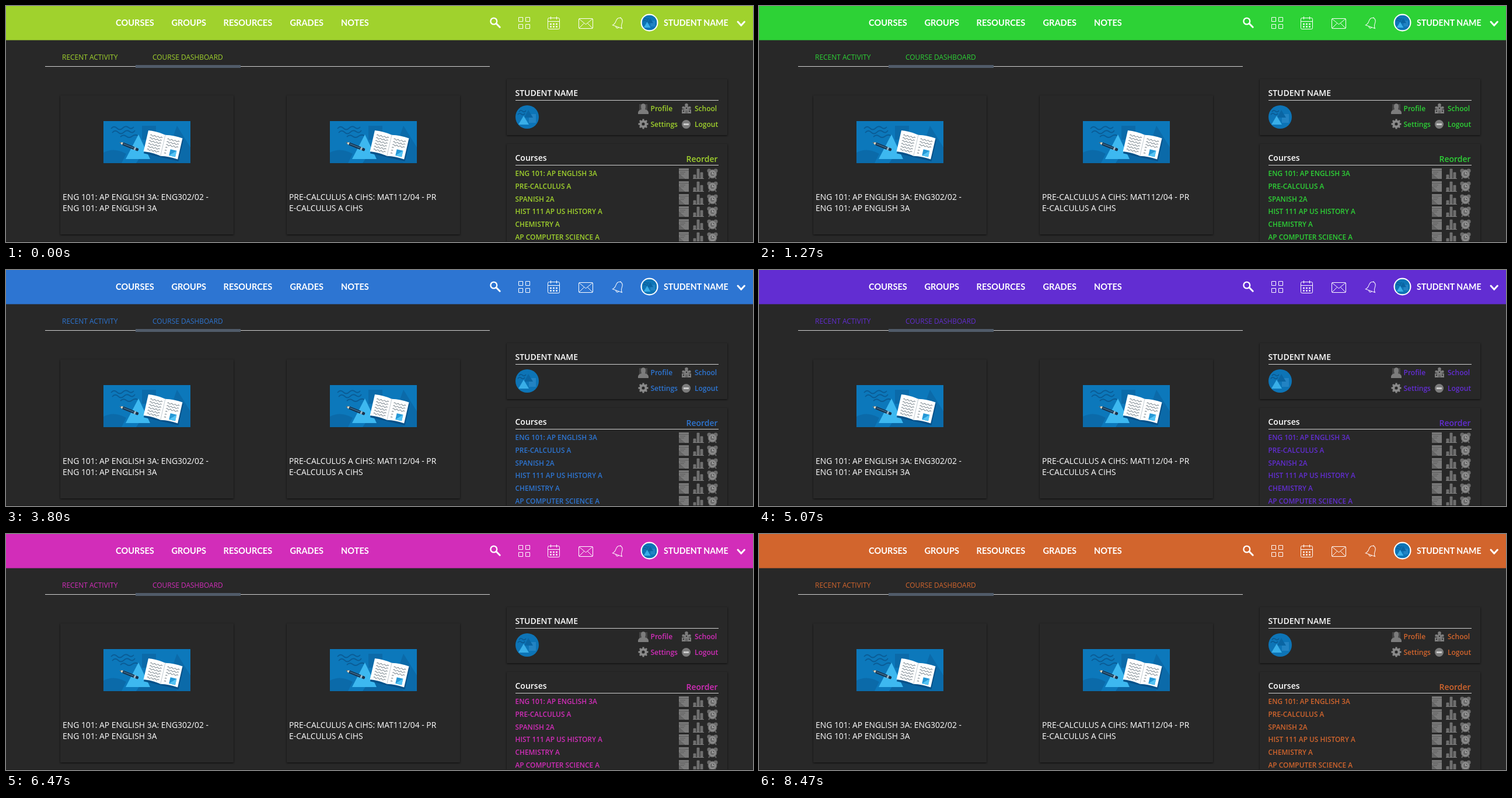
Animation of 1280x404 px, one loop 8540 ms. Source, as an HTML page:

```html
<!DOCTYPE html>
<html lang="en">
<head>
<meta charset="utf-8">
<title>Course dashboard</title>
<style>
  html, body { margin: 0; width: 100%; height: 100%; overflow: hidden; background: #282828; }
  svg { display: block; width: 100vw; height: 100vh; }
  text { font-family: "Open Sans", sans-serif; white-space: pre; }
  .nav { font: 700 14.6px Lato, sans-serif; fill: #fff; }
  .user { font: 700 14.2px Lato, sans-serif; fill: #fff; }
  .tab { font-size: 11.95px; }
  .card { font-size: 13.9px; fill: #fff; }
  .head { font-size: 14px; font-weight: 600; }
  .link { font-size: 12px; font-weight: 600; }
  .course { font-size: 11.88px; font-weight: 600; }
  .accent { fill: var(--accent); }
  .white { fill: #fff; }
  .line { fill: none; stroke: #fff; }
  .panel { fill: #282828; filter: drop-shadow(0 1px 1.5px rgba(0, 0, 0, .7)); }
</style>
</head>
<body>
<svg id="stage" viewBox="0 0 1280 404">
  <defs>
    <symbol id="cover" width="149" height="72" viewBox="0 0 149 72">
      <path fill="#0c78bb" d="M0 0h149v72H0z"/>
      <path fill="#0b6aa9" d="M66 8h24v24H66zM126 8l23 37v27h-46zM0 54q18-10 39 2l-8 16H0z"/>
      <path fill="#0a66a4" d="M91 20l35 52H56z"/>
      <path fill="none" stroke="#0a5c96" stroke-width="1.8"
        d="M13 13q5-6 10-1t10 0t10-1t9-1M15 20q5-6 10-1t10 0t10-1t9-2M29 27q5-5 10-1t10 0t10-1"/>
      <path fill="#3db8f0" d="M60 23L80 65H38z"/>
      <g transform="translate(27.500 36.500) rotate(22)">
        <path fill="#e9d7bd" d="M0 0l6-2.500v5z"/>
        <path fill="#17324d" d="M0 0l2.500-1v2zM6-2.500h21v5H6z"/>
        <path fill="#3f7396" d="M7-1h19v1.500H7z"/>
        <path fill="#9eb1bd" d="M27-2.500h3v5h-3z"/>
        <path fill="#17324d" d="M30-2.500h4q2 2.500 0 5h-4z"/>
      </g>
      <g transform="translate(77 16) rotate(13)">
        <path fill="#07528a" d="M1 2h61v38H1z"/>
        <path fill="#fff" d="M0 0q15-2 30 1q15-3 30-1v37q-15-2-30 1q-15-3-30-1z"/>
        <path stroke="#c3ccd2" d="M30 1v37"/>
        <g id="script" fill="none" stroke="#8b969d" stroke-width="1.2"></g>
        <path fill="#2698d6" d="M44 23h11v11H44z"/>
        <path fill="#55c4f5" d="M55 23v11H44z"/>
      </g>
    </symbol>
    <symbol id="avatar" width="40" height="40" viewBox="0 0 40 40">
      <circle cx="20" cy="20" r="20" fill="#0d74b6"/>
      <path fill="#2283c3" d="M23 15h12v15H23z"/>
      <path fill="#0a65a3" d="M22 8l8 13H15z"/>
      <path fill="none" stroke="#0a588f" stroke-width="1.6" d="M6 11q3-4 6-1t6-1M4 16q3-4 6-1t6-1"/>
      <path fill="#39aee8" d="M14 18l9 15H5z"/>
    </symbol>
    <g id="tools">
      <path fill="#7a7a7a" d="M1153 0h17v18h-7l-10-9z"/>
      <path fill="#5c5c5c" d="M1153 3h17v1h-17zM1155 6h9v1h-9zM1155 9h7v1h-7z"/>
      <path fill="#666" d="M1153 9l10 9h-10z"/>
      <path fill="#6c6c6c" stroke="#868686" stroke-width=".6" d="M1178 11h4v6h-4zM1184 1h4v16h-4zM1190 7h4v10h-4z"/>
      <path fill="#7c7c7c" d="M1177 17h19v1h-19z"/>
      <circle cx="1205" cy="4" r="3.600" fill="#6c6c6c"/>
      <circle cx="1216" cy="4" r="3.600" fill="#6c6c6c"/>
      <path stroke="#6c6c6c" stroke-width="2" d="M1206 15l-2 3M1215 15l2 3"/>
      <circle cx="1210.500" cy="9.500" r="7.400" fill="#808080" stroke="#606060"/>
      <circle cx="1210.500" cy="9.500" r="4.600" fill="#6c6c6c" stroke="#a4a4a4"/>
      <path fill="none" stroke="#bbb" d="M1210.500 6.500v3h3"/>
    </g>
  </defs>

  <path fill="#282828" d="M0 0h1280v404H0z"/>
  <path class="accent" d="M0 0h1280v58.600H0z"/>

  <!-- header icons -->
  <g class="line">
    <circle cx="835.800" cy="26" r="5.400" stroke-width="2.300"/>
    <path stroke-width="3" stroke-linecap="round" d="M840.500 30.500l5.700 5.700"/>
    <path d="M878.500 19.500h7v7h-7zM890.500 19.500h7v7h-7zM878.500 31.500h7v7h-7zM890.500 31.500h7v7h-7z"/>
    <rect x="928.500" y="20.500" width="20" height="19" rx="2"/>
    <path d="M928.500 26.500h20M933.500 18v5M943.500 18v5"/>
    <path stroke-width="2.400" stroke-dasharray="2.600 2.400" d="M932.200 31h13M932.200 35.500h13"/>
    <rect x="981.500" y="21.500" width="24" height="17" rx="1.500"/>
    <path d="M982 22l11.500 9.500L1005 22M982 38l8.500-8.500M1005 38l-8.500-8.500"/>
    <g transform="translate(1050 28.500) rotate(20)">
      <path d="M-8.500 7.500q3-3 3-8q0-7.500 5.500-8q5.500.5 5.500 8q0 5 3 8zM-2.500 8q2.500 4 5 0M0-8.500v-1.500"/>
    </g>
    <path stroke-width="3" stroke-linecap="round" stroke-linejoin="round" d="M1254 27l5.700 6.300l5.700-6.300"/>
  </g>
  <circle cx="1102.500" cy="28.500" r="15" fill="#fff"/>
  <use href="#avatar" transform="translate(1089.500 15.500) scale(.65)"/>

  <!-- tabs -->
  <path fill="#d2d2d2" d="M67 103h762v1H67z"/>
  <path fill="#505b69" d="M222 101h180v5H222z"/>

  <!-- panels -->
  <g class="panel">
    <rect x="93" y="153" width="297" height="238" rx="1"/>
    <rect x="481" y="153" width="297" height="238" rx="1"/>
    <rect x="858" y="125" width="378" height="96" rx="1"/>
    <rect x="858" y="236" width="378" height="190" rx="1"/>
  </g>
  <use href="#cover" x="167" y="197"/>
  <use href="#cover" x="555" y="197"/>
  <use href="#avatar" x="873" y="170"/>
  <path fill="#d0d0d0" d="M873 161h348v1H873zM873 272h348v1H873z"/>

  <!-- profile icons -->
  <g fill="#7c7c7c">
    <path fill="#444" d="M1085 168h14v16h-14z"/>
    <path d="M1083 185v-3q1-4 6-5q-3-10 3-10t3 10q5 1 6 5v3z"/>
    <path d="M1158 184v-7h4v-4l4-3l4 3v4h4v7z"/>
    <path fill="#666" d="M1164 179h4v5h-4z"/>
    <circle cx="1166" cy="169.500" r="2.800"/>
    <circle cx="1160.500" cy="174" r="2.200"/>
    <circle cx="1171.500" cy="174" r="2.200"/>
    <path fill="#303030" d="M1160 179h2v2h-2zM1170 179h2v2h-2zM1165 174h2v2h-2z"/>
    <circle cx="1092" cy="202" r="4.600" fill="none" stroke="#8a8a8a" stroke-width="4"/>
    <path id="teeth" stroke="#8a8a8a" stroke-width="3"/>
    <circle cx="1165.500" cy="202.500" r="7.500"/>
    <path fill="#ccc" d="M1161 201h9v3h-9z"/>
  </g>

  <g id="rows"></g>
  <g id="labels"></g>
  <path fill="#1d1d1d" d="M0 403h1280v1H0z"/>
</svg>
<script>
  const NS = "http://www.w3.org/2000/svg";
  const el = id => document.getElementById(id);

  function add(parent, tag, attrs, text = "") {
    const node = document.createElementNS(NS, tag);
    for (const key in attrs) node.setAttribute(key, attrs[key]);
    node.textContent = text;
    parent.appendChild(node);
  }

  const label = (x, y, cls, text) => add(el("labels"), "text", { x, y, class: cls }, text);

  label(188, 34, "nav", "COURSES");
  label(283.5, 34, "nav", "GROUPS");
  label(372.5, 34, "nav", "RESOURCES");
  label(486.5, 34, "nav", "GRADES");
  label(574, 34, "nav", "NOTES");
  label(1127, 34, "user", "STUDENT NAME");
  label(96, 92, "tab accent", "RECENT ACTIVITY");
  label(251, 92, "tab accent", "COURSE DASHBOARD");
  label(97, 332, "card", "ENG 101: AP ENGLISH 3A: ENG302/02 -");
  label(97, 351, "card", "ENG 101: AP ENGLISH 3A");
  label(485, 332, "card", "PRE-CALCULUS A CiHS: MAT112/04 - PR");
  label(485, 351, "card", "E-CALCULUS A CiHS");
  label(872.5, 154, "head white", "STUDENT NAME");
  label(872.5, 265, "head white", "Courses");
  label(1165.5, 267, "head accent", "Reorder");
  label(1104.5, 180, "link accent", "Profile");
  label(1180, 180, "link accent", "School");
  label(1104.5, 207, "link accent", "Settings");
  label(1180, 207, "link accent", "Logout");

  const courses = ["ENG 101: AP ENGLISH 3A", "PRE-CALCULUS A", "SPANISH 2A",
    "HIST 111 AP US HISTORY A", "CHEMISTRY A", "AP COMPUTER SCIENCE A"];
  courses.forEach((name, i) => {
    const y = Math.round(291 + i * 21.8);
    label(872.5, y, "course accent", name);
    add(el("rows"), "use", { href: "#tools", y: y - 13 });
  });

  // handwriting on the open pages
  for (let i = 0; i < 6; i++) {
    const y = 7 + i * 5;
    const right = i < 3 ? "t3 0t3 0t3 0t3 0t3 0t3 0" : "";
    add(el("script"), "path", { d: `M5 ${y}q1.5-2 3 0t3 0t3 0t3 0t3 0t3 0t3 0` });
    add(el("script"), "path", { d: `M35 ${y}q1.5-2 3 0${right}` });
  }

  let teeth = "";
  for (let i = 0; i < 8; i++) {
    const a = i * Math.PI / 4, c = Math.cos(a), s = Math.sin(a);
    teeth += `M${1092 + 5 * c} ${202 + 5 * s}L${1092 + 8.5 * c} ${202 + 8.5 * s}`;
  }
  el("teeth").setAttribute("d", teeth);

  const LOOP = 8540, STEP = 200 / 3, LAST = 127;
  const START_HUE = 78.3, HUE_STEP = 2.38;

  function draw(ms) {
    const step = Math.min(LAST, Math.floor((ms % LOOP + 3.4) / STEP));
    const hue = (START_HUE + step * HUE_STEP) % 360;
    el("stage").style.setProperty("--accent", `hsl(${hue.toFixed(2)}, 65%, 50%)`);
  }

  const began = performance.now();
  function tick() {
    draw(performance.now() - began);
    requestAnimationFrame(tick);
  }
  tick();
</script>
</body>
</html>
```
